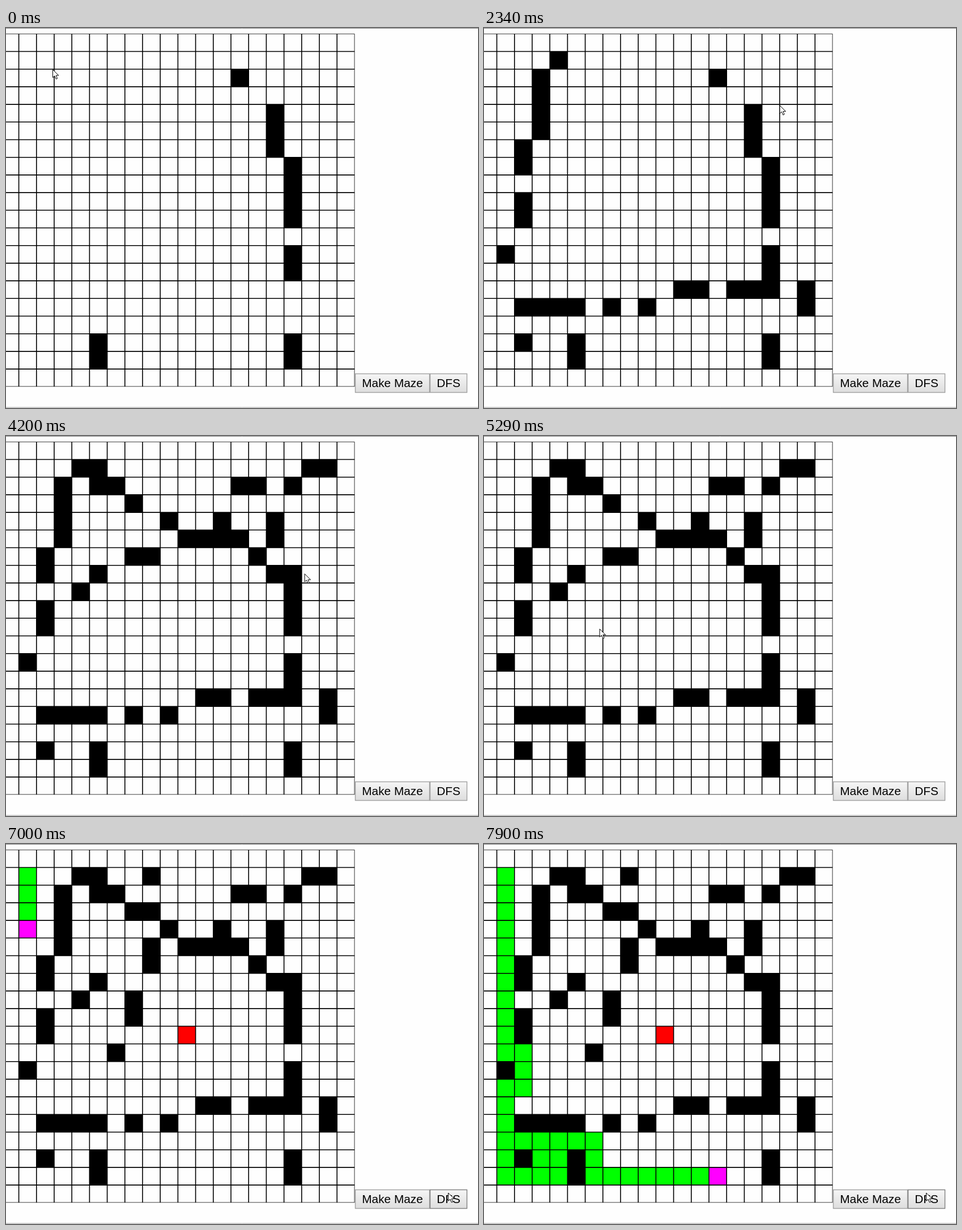
An HTML page with a canvas for the animation above (8 s loop, 833 px wide and 672 px high).

```html
<!DOCTYPE html>
<html lang="en">
<head>
<meta charset="utf-8">
<title>Maze search</title>
<style>
html, body { margin: 0; width: 100%; height: 100%; overflow: hidden; background: #fefefe; }
canvas { display: block; }
</style>
</head>
<body>
<canvas id="stage" width="833" height="672"></canvas>
<script>
const ctx = document.getElementById('stage').getContext('2d');
const LOOP = 8000, REFRESH = 130, PHASE = 30;
const LEFT = 22.6, TOP = 10.3, PITCH = 31.2, ROWS = 20, COLS = 19;
const goal = [9, 10];

// Blocks of cells: column, row, width, height
const maze = [[12, 2], [14, 4, 1, 3], [15, 7, 1, 4], [15, 12, 1, 2], [4, 17, 1, 2], [15, 17, 1, 2]];

// Each drag toggles its blocks one after another at an even pace
const drags = [
  { from: 360, to: 650, blocks: [[3, 1], [2, 2, 1, 4], [1, 6, 1, 2], [1, 9, 1, 2], [0, 12], [1, 17]] },
  { from: 1430, to: 1660, blocks: [[1, 15, 4], [6, 15], [8, 15], [10, 14, 2], [13, 14, 3], [17, 14, 1, 2]] },
  { from: 2880, to: 3150, blocks: [[16, 1, 2], [15, 2], [13, 2], [11, 4], [9, 5], [6, 6, 2], [4, 7], [3, 8]] },
  { from: 3740, to: 3870, blocks: [[4, 1], [4, 2, 2], [6, 3], [8, 4], [10, 5, 3], [13, 6], [14, 6], [14, 7]] },
  { from: 5450, to: 5690, blocks: [[5, 11], [6, 8, 1, 2], [6, 6], [7, 5], [7, 3], [7, 1]] }
];
const strokes = drags.flatMap(({ from, to, blocks }) =>
  blocks.map((block, i) => ({ time: from + (to - from) * i / (blocks.length - 1), block })));

// Where the pointer goes between drags: time, x, y
const roam = [
  [0, 82, 73], [230, 121, 70], [750, 67, 645], [1010, 135, 478], [1300, 62, 490],
  [1920, 613, 510], [2310, 521.5, 136.5], [2700, 564, 58], [3270, 141, 203], [3600, 168, 75],
  [4190, 538.5, 243], [4320, 621, 194], [4580, 85, 449], [4840, 198, 443], [5250, 205, 316],
  [5400, 179, 399], [5820, 306, 41], [5950, 394, 211], [6080, 513, 517], [6600, 735, 630],
  [6860, 780, 616.5], [LOOP, 780, 616.5]
];
const path = [
  ...roam,
  ...strokes.map(({ time, block: [c, r, w = 1, h = 1] }) =>
    [time, LEFT + (c + w / 2) * PITCH, TOP + (r + h / 2) * PITCH])
].sort((a, b) => a[0] - b[0]);

const buttons = [['Make Maze', 616, 132], ['DFS', 748, 66]];
const BTN_Y = 611, BTN_H = 34;
const arrow = [[0, 0], [0, 14.2], [3.3, 11.2], [5.8, 16.8], [8.1, 15.8], [5.8, 10.4], [10.4, 10.4]];

const key = (c, r) => c + ',' + r;

function toggle(cells, [c, r, w = 1, h = 1]) {
  for (let i = 0; i < w; i++) {
    for (let j = 0; j < h; j++) {
      const k = key(c + i, r + j);
      if (!cells.delete(k)) cells.add(k);
    }
  }
}

function wallsAt(t) {
  const cells = new Set();
  maze.forEach(b => toggle(cells, b));
  strokes.forEach(s => { if (t >= s.time) toggle(cells, s.block); });
  return cells;
}

// Depth-first visiting order: left, down, right, up
function search(walls) {
  const seen = new Set(walls), order = [];
  (function visit(c, r) {
    const k = key(c, r);
    if (c < 0 || c >= COLS - 1 || r < 1 || r >= ROWS - 1 || seen.has(k)) return;
    seen.add(k);
    order.push([c, r]);
    visit(c - 1, r);
    visit(c, r + 1);
    visit(c + 1, r);
    visit(c, r - 1);
  })(0, 1);
  return order;
}
const order = search(wallsAt(LOOP));

// The search starts fast, then settles to a slower pace
function visitedAt(t) {
  const fast = 1 + (t - 6930) / 20, slow = (t - 6625) / 32.5;
  return Math.max(0, Math.floor(Math.min(fast, slow)));
}

function pointerAt(t) {
  const i = path.findIndex(p => p[0] > t);
  const [t0, x0, y0] = path[i - 1], [t1, x1, y1] = path[i];
  const u = (t - t0) / (t1 - t0);
  return [x0 + (x1 - x0) * u, y0 + (y1 - y0) * u];
}

function fillCell([c, r], color) {
  ctx.fillStyle = color;
  ctx.fillRect(LEFT + c * PITCH, TOP + r * PITCH, PITCH, PITCH);
}

function line(x0, y0, x1, y1, width, color) {
  ctx.strokeStyle = color;
  ctx.lineWidth = width;
  ctx.beginPath();
  ctx.moveTo(x0, y0);
  ctx.lineTo(x1, y1);
  ctx.stroke();
}

// The outer lines are cut in half by the edge of the board
function drawGrid() {
  const right = LEFT + COLS * PITCH, bottom = TOP + ROWS * PITCH;
  ctx.save();
  ctx.beginPath();
  ctx.rect(0, TOP, right, bottom - TOP);
  ctx.clip();
  for (let c = 0; c <= COLS; c++) {
    const x = LEFT + c * PITCH;
    line(x, TOP, x, bottom, 1.6, '#000');
  }
  for (let r = 0; r <= ROWS; r++) {
    const y = TOP + r * PITCH;
    line(0, y, right, y, 1.6, '#000');
  }
  ctx.restore();
}

function drawButton([label, x, w], [px, py]) {
  const hover = px >= x && px < x + w && py >= BTN_Y && py < BTN_Y + BTN_H;
  const shade = ctx.createLinearGradient(0, BTN_Y, 0, BTN_Y + BTN_H);
  shade.addColorStop(0, '#f6f6f6');
  shade.addColorStop(1, '#dddddd');
  ctx.fillStyle = shade;
  ctx.fillRect(x, BTN_Y, w, BTN_H);
  ctx.strokeStyle = hover ? '#808080' : '#a0a0a0';
  ctx.lineWidth = 1.4;
  ctx.strokeRect(x + 0.5, BTN_Y + 0.5, w - 1, BTN_H - 1);
  ctx.fillStyle = '#000';
  ctx.font = '20.8px "Liberation Sans", Arial, sans-serif';
  ctx.textAlign = 'center';
  ctx.fillText(label, x + w / 2, 635);
}

function drawPointer([x, y]) {
  ctx.beginPath();
  arrow.forEach(([dx, dy]) => ctx.lineTo(x + dx + 0.5, y + dy + 0.5));
  ctx.closePath();
  ctx.fillStyle = '#fff';
  ctx.fill();
  ctx.strokeStyle = '#000';
  ctx.lineWidth = 1;
  ctx.stroke();
}

function draw(t) {
  const pointer = pointerAt(t), n = visitedAt(t);
  ctx.fillStyle = '#fefefe';
  ctx.fillRect(0, 0, 833, 672);
  line(0, 0.5, 833, 0.5, 1, '#808080');
  line(0, 671, 833, 671, 1, '#999');

  for (const k of wallsAt(t)) fillCell(k.split(','), '#000');
  if (n) fillCell(goal, '#f00');
  order.slice(0, n).forEach((cell, i) => fillCell(cell, i === n - 1 ? '#f0f' : '#0f0'));
  drawGrid();
  buttons.forEach(b => drawButton(b, pointer));
  drawPointer(pointer);
}

// The screen only refreshes every REFRESH ms
function frame() {
  const now = performance.now() % LOOP;
  draw(Math.max(0, Math.floor((now + PHASE) / REFRESH) * REFRESH - PHASE));
  requestAnimationFrame(frame);
}
frame();
</script>
</body>
</html>
```
